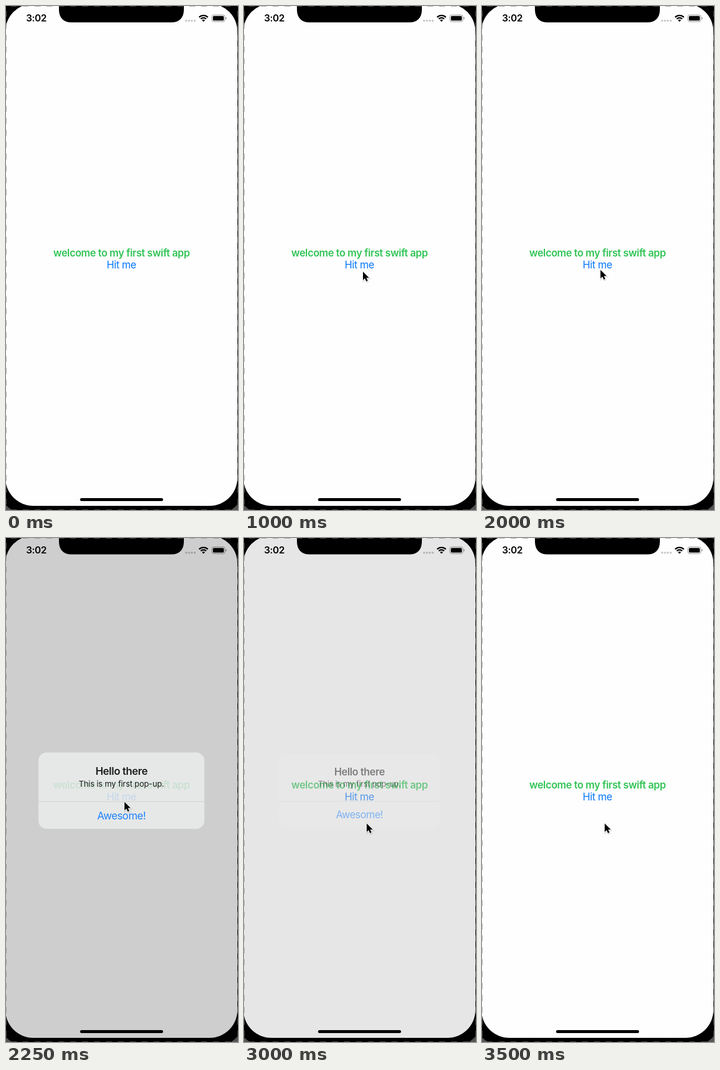
Recreate the animation shown at these times as an HTML page. Size 390 by 847 pixels, loop 3750 ms.

```html
<!DOCTYPE html>
<html lang="en">
<head>
<meta charset="utf-8">
<title>Pop-up demo</title>
<style>
  html, body { margin: 0; width: 100%; height: 100%; overflow: hidden; background: #000; }
  svg { display: block; width: 100%; height: 100%; }
  text { font-family: Inter, Roboto, "Liberation Sans", sans-serif; font-size: 17px; letter-spacing: -0.4px; text-anchor: middle; }
  .bold { font-weight: 600; }
  .link { fill: #0676fc; }
  .edge { fill: none; stroke: #787878; stroke-opacity: .6; stroke-dasharray: 10 10; }
</style>
</head>
<body>
<svg viewBox="0 0 390 847">
  <!-- phone body and screen -->
  <rect width="390" height="847" fill="#555"/>
  <rect x="-19" y="-22" width="426" height="880" rx="65"/>
  <rect x="-1" y="-4" width="390" height="844" rx="47" fill="#fefefe"/>

  <text class="bold" x="194.3" y="420.7" fill="#32c456">welcome to my first swift app</text>
  <text class="link" x="194" y="441">Hit me</text>

  <rect id="dim" x="-1" y="-4" width="390" height="844" rx="47"/>

  <!-- status bar, notch, home indicator -->
  <text class="bold" x="51" y="26.4" style="font-size:16px;letter-spacing:-.3px">3:02</text>
  <g fill-opacity=".22">
    <circle cx="302.8" cy="24.7" r="1.8"/><circle cx="307.6" cy="24.7" r="1.8"/>
    <circle cx="312.4" cy="24.7" r="1.8"/><circle cx="317.2" cy="24.7" r="1.8"/>
  </g>
  <g fill="none" stroke="#000" stroke-width="2.3">
    <path d="M324.6 18.9a10.6 10.6 0 0 1 14.8 0"/>
    <path d="M327.4 21.8a6.6 6.6 0 0 1 9.2 0"/>
  </g>
  <path d="M332 26.6l-2.5-2.6a3.6 3.6 0 0 1 5 0z"/>
  <rect x="346" y="15" width="22" height="11.4" rx="3.2" fill="none" stroke="#000" stroke-opacity=".4"/>
  <rect x="347.8" y="16.8" width="18.4" height="7.8" rx="1.7"/>
  <path d="M369.4 18.8q1.6.6 1.6 1.9t-1.6 1.9z" fill-opacity=".45"/>
  <path d="M89-4V6C89 20 97 27.6 110 27.6H278C291 27.6 299 20 299 6V-4z"/>
  <rect x="124.5" y="827" width="139.5" height="5" rx="2.5"/>

  <!-- alert -->
  <g id="alert">
    <g id="panel">
      <rect x="59" y="362.5" width="270" height="124.3" rx="13.5" fill="#eceeee"/>
      <path d="M59 442.5H329" stroke="#cfd2d2"/>
    </g>
    <g id="words">
      <text class="bold" x="194.2" y="398.5">Hello there</text>
      <text x="194" y="418.2" style="font-size:13px;letter-spacing:-.13px">This is my first pop-up.</text>
      <text class="link" x="194" y="471" style="letter-spacing:-.5px">Awesome!</text>
    </g>
  </g>

  <!-- capture border -->
  <path class="edge" d="M.5 8V847"/>
  <path class="edge" d="M389.5 8V847"/>
  <path class="edge" d="M8 .5H390"/>
  <path class="edge" d="M8 846.5H390"/>

  <g id="cursor">
    <path d="M0 0V14.2L3.2 11.2L5.5 16.2L8 15.1L5.8 10.2H10.2z" transform="translate(.6 1.2)" fill="none" stroke="#000" stroke-opacity=".13" stroke-width="2.6"/>
    <path d="M0 0V14.2L3.2 11.2L5.5 16.2L8 15.1L5.8 10.2H10.2z" stroke="#fff" stroke-width="1.4" paint-order="stroke"/>
  </g>
</svg>
<script>
  const LOOP = 3750;
  const el = id => document.getElementById(id);
  const dim = el("dim"), alertBox = el("alert"), panel = el("panel"), words = el("words"), cursor = el("cursor");

  // Each entry holds from its time (ms) until the next.
  const pointer = [
    [0, null], [250, [172, 414]], [500, [165, 489]], [750, [200, 452]],
    [1000, [200, 446.6]], [1500, [199.7, 445.6]], [1750, [199.2, 443.6]],
    [2500, [203, 464]], [2750, [206.3, 479.8]]
  ];
  // dim, panel opacity, text opacity, scale
  const popup = [
    [0, [0, 0, 0, 1]],
    [2250, [.188, .83, .88, 1.033]],
    [2500, [.224, 1, 1, 1]],
    [3000, [.093, .35, .46, 1]],
    [3250, [0, .02, .03, 1]],
    [3500, [0, 0, 0, 1]]
  ];

  const held = (keys, t) => keys.reduce((last, [at, value]) => t >= at ? value : last, null);

  function draw(t) {
    const tip = held(pointer, t);
    cursor.setAttribute("visibility", tip ? "visible" : "hidden");
    if (tip) cursor.setAttribute("transform", `translate(${tip})`);

    const [shade, back, ink, scale] = held(popup, t);
    dim.setAttribute("opacity", shade);
    panel.setAttribute("opacity", back);
    words.setAttribute("opacity", ink);
    alertBox.setAttribute("transform", `translate(194 424.7) scale(${scale}) translate(-194 -424.7)`);
  }

  const start = performance.now();
  function tick() {
    draw((performance.now() - start) % LOOP);
    requestAnimationFrame(tick);
  }
  tick();
</script>
</body>
</html>
```
